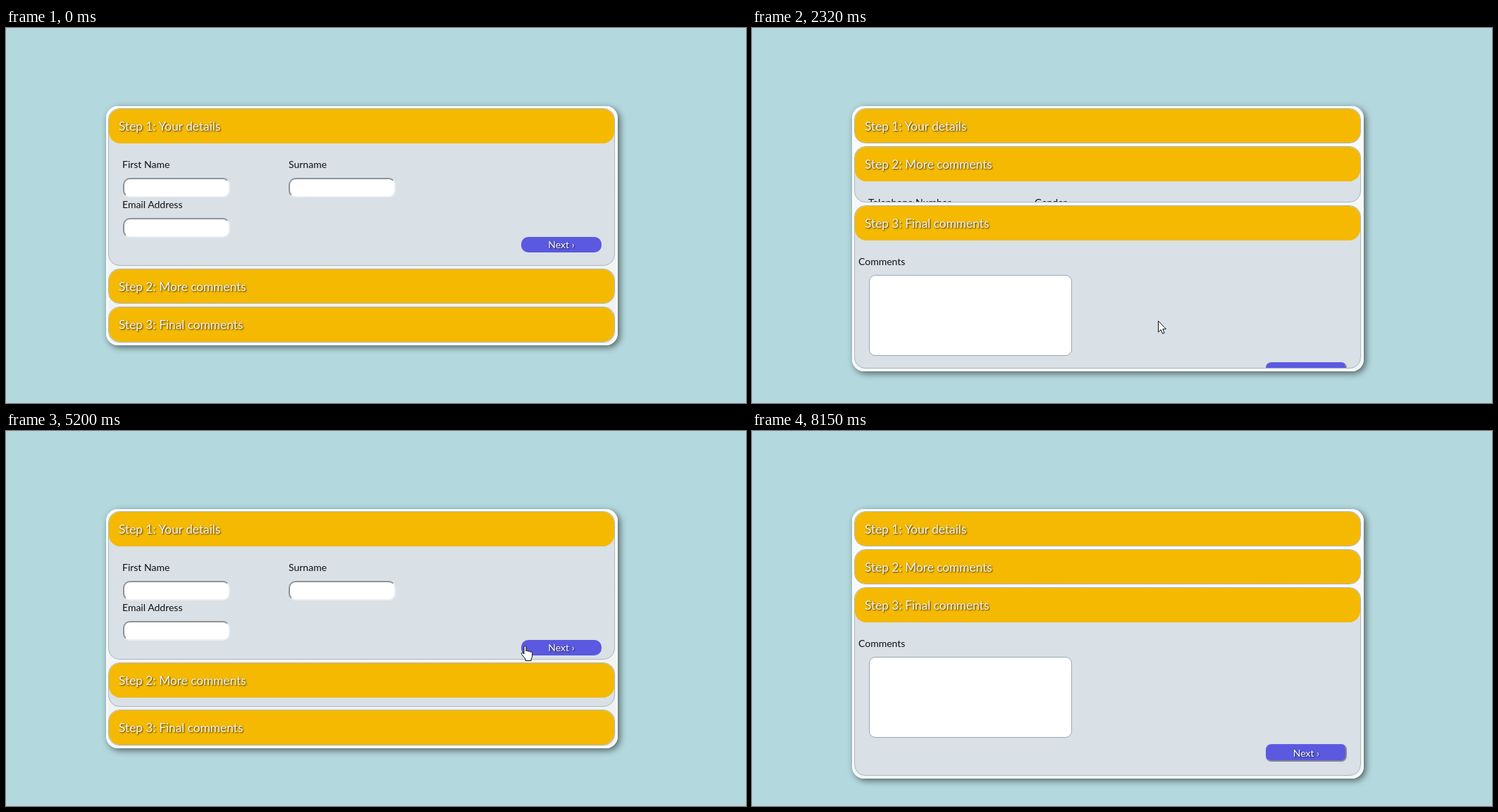
Recreate the animation shown at these times as an HTML page. Size 1050 by 533 pixels, loop 8.46 s.

```html
<!DOCTYPE html>
<html lang="en">
<head>
<meta charset="utf-8">
<title>Step form</title>
<style>
* { box-sizing: border-box; }
html, body { margin: 0; width: 100%; height: 100%; overflow: hidden; }
body { position: relative; background: #b3d8dd; color: #111; font: 14px/20px Lato, sans-serif; }
#panel {
  position: absolute; left: 142px; top: 111px; width: 726px; padding: 3px 4px 4px 3px;
  border-radius: 17px; background: linear-gradient(#fbfcfc, #efefef);
  box-shadow: inset 0 0 0 3px #f9fbfb, 3px 3px 10px rgba(0, 0, 0, .55);
}
.step {
  position: relative; height: 50px; margin-bottom: 4px; overflow: hidden;
  border: 1px solid #a9b9c2; border-radius: 16px; background: #d9e0e6;
}
.step:last-child { margin: 0; }
h2 {
  margin: 0; padding-left: 14px; height: 49px; border-radius: 16px; background: #f4b900;
  color: #f5f5f0; font: 17.3px/49px Lato, sans-serif; text-shadow: 1px 1px 2px rgba(0, 0, 0, .75);
}
.body { position: absolute; left: 0; top: 49px; }
.body * { position: absolute; white-space: nowrap; }
.field {
  height: 28px; border: 2px solid; border-color: #8d9398 #eceeef #eceeef #8d9398;
  border-radius: 10px; background: #fff;
}
.select {
  width: 109px; height: 32px; padding-left: 4px; border: 1px solid #a3abae; border-radius: 10px;
  background: #f3f4f4; color: #868886; line-height: 30px;
}
.select i { left: 96px; top: 13px; border: 3px solid transparent; border-top: 5px solid #d3d5d5; }
.area { width: 288px; height: 115px; border: 1px solid #9ca8b1; border-radius: 9px; background: #fff; }
.next {
  width: 114px; height: 22px; border-radius: 10px; background: #5a59e0; color: #fff;
  text-align: center; line-height: 21px; text-shadow: 1px 1px 2px rgba(0, 0, 0, .8);
}
.next.raised {
  width: 115px; height: 25px; border: 2px solid; border-color: #5f5ee0 #85868f #85868f #5f5ee0; border-radius: 8px;
}
svg { position: absolute; left: 0; top: 0; overflow: visible; fill: #fff; stroke: #111; stroke-linejoin: round; }
</style>
</head>
<body>
<div id="panel"></div>
<svg id="cursor" width="20" height="24">
  <path id="arrow" d="M.5 .5V16.3L4.2 12.8 6.7 18.5 9.2 17.4 6.8 11.9H11.5Z"/>
  <path id="hand" transform="translate(-5.5 -1)" d="M4.5 12V2.2a1.5 1.5 0 0 1 3 0V8q.2-1 1.5-.9t1.5 1.4q.2-.9 1.5-.7t1.4 1.5q.3-.8 1.5-.5t1.3 1.6V15q0 2-1.6 4v2.5H6.5V19L1.3 12.6q-1.1-1.7.1-2.3t2 .5Z"/>
</svg>
<script>
const LOOP = 8460, SLIDE = 500;
const at = (cls, x, y, text = '', width) =>
  `<div class="${cls}" style="left:${x}px;top:${y}px;${width ? `width:${width}px` : ''}">${text}</div>`;
const label = (x, y, text) => at('label', x, y, text);
const field = (x, y, width = 152) => at('field', x, y, '', width);
const next = (x, y, cls = '') => at('next ' + cls, x, y, 'Next ›');

const steps = [
  { title: 'Step 1: Your details', open: 174, closed: 0, button: [585, 133],
    body: label(19, 20, 'First Name') + field(20, 49) + label(255, 20, 'Surname') + field(255, 49) +
      label(19, 77, 'Email Address') + field(20, 106) + next(585, 133) },
  { title: 'Step 2: More comments', open: 179, closed: 0, button: [585, 138],
    body: label(19, 20, 'Telephone Number') + field(20, 49) + label(255, 20, 'Gender') +
      at('select', 255, 49, 'Select Gender<i></i>') + label(19, 82, 'Date of birth') +
      [20, 98, 176].map(x => field(x, 111, 51)).join('') + next(585, 138) },
  { title: 'Step 3: Final comments', open: 218, closed: 1, button: [583, 173],
    body: label(5, 20, 'Comments') + at('area', 20, 49) + next(583, 173, 'raised') },
];
const $ = id => document.getElementById(id);
$('panel').innerHTML = steps.map(s =>
  `<div class="step"><div class="body">${s.body}</div><h2>${s.title}</h2></div>`).join('');
const boxes = [...document.querySelectorAll('.step')];

// start time, step that closes, step that opens
const slides = [[793, 0, 1], [1955, 1, 2], [3807, 2, 0], [5114, 0, 1], [6225, 1, 2]];
// time, x, y of the pointer tip
const path = [
  [140, 934, 505], [490, 567, 350], [1480, 567, 350], [1860, 576, 416], [2800, 576, 416],
  [3320, 490.5, 140], [4380, 490.5, 140], [4730, 736, 306], [5640, 736, 306],
  [5890, 774, 374], [6120, 774, 374], [6190, 776, 374], [7380, 776, 374], [8150, 1006, 536],
];
const swing = p => .5 - Math.cos(Math.PI * Math.min(1, Math.max(0, p))) / 2;

function pointer(t) {
  const i = path.findIndex(p => p[0] > t);
  if (i < 1) return null;
  const [t0, x0, y0] = path[i - 1], [t1, x1, y1] = path[i];
  const k = swing((t - t0) / (t1 - t0));
  return [x0 + (x1 - x0) * k, y0 + (y1 - y0) * k];
}

function draw(t) {
  const shown = [0, 0, 0];
  const [start, from, to] = slides.filter(s => s[0] <= t).pop() || [-SLIDE, 2, 0];
  shown[to] = swing((t - start) / SLIDE);
  shown[from] = 1 - shown[to];

  const tip = pointer(t);
  let top = 115, hover = false;
  steps.forEach((s, i) => {
    const height = s.closed + (s.open - s.closed) * shown[i];
    boxes[i].style.height = 50 + height + 'px';
    if (tip) {
      const dx = tip[0] - 146, dy = tip[1] - top - 49, [bx, by] = s.button;
      const onTitle = dx > 0 && dx < 717 && dy > -49 && dy < 0;
      const onButton = dx > bx && dx < bx + 114 && dy > by && dy < Math.min(by + 22, height);
      hover = hover || onTitle || onButton;
    }
    top += 54 + height;
  });

  $('cursor').style.display = tip ? '' : 'none';
  if (tip) {
    $('cursor').style.transform = `translate(${Math.round(tip[0])}px, ${Math.round(tip[1])}px)`;
    $('arrow').style.display = hover ? 'none' : '';
    $('hand').style.display = hover ? '' : 'none';
  }
}

const begin = performance.now();
(function frame() {
  draw((performance.now() - begin) % LOOP);
  requestAnimationFrame(frame);
})();
</script>
</body>
</html>
```
